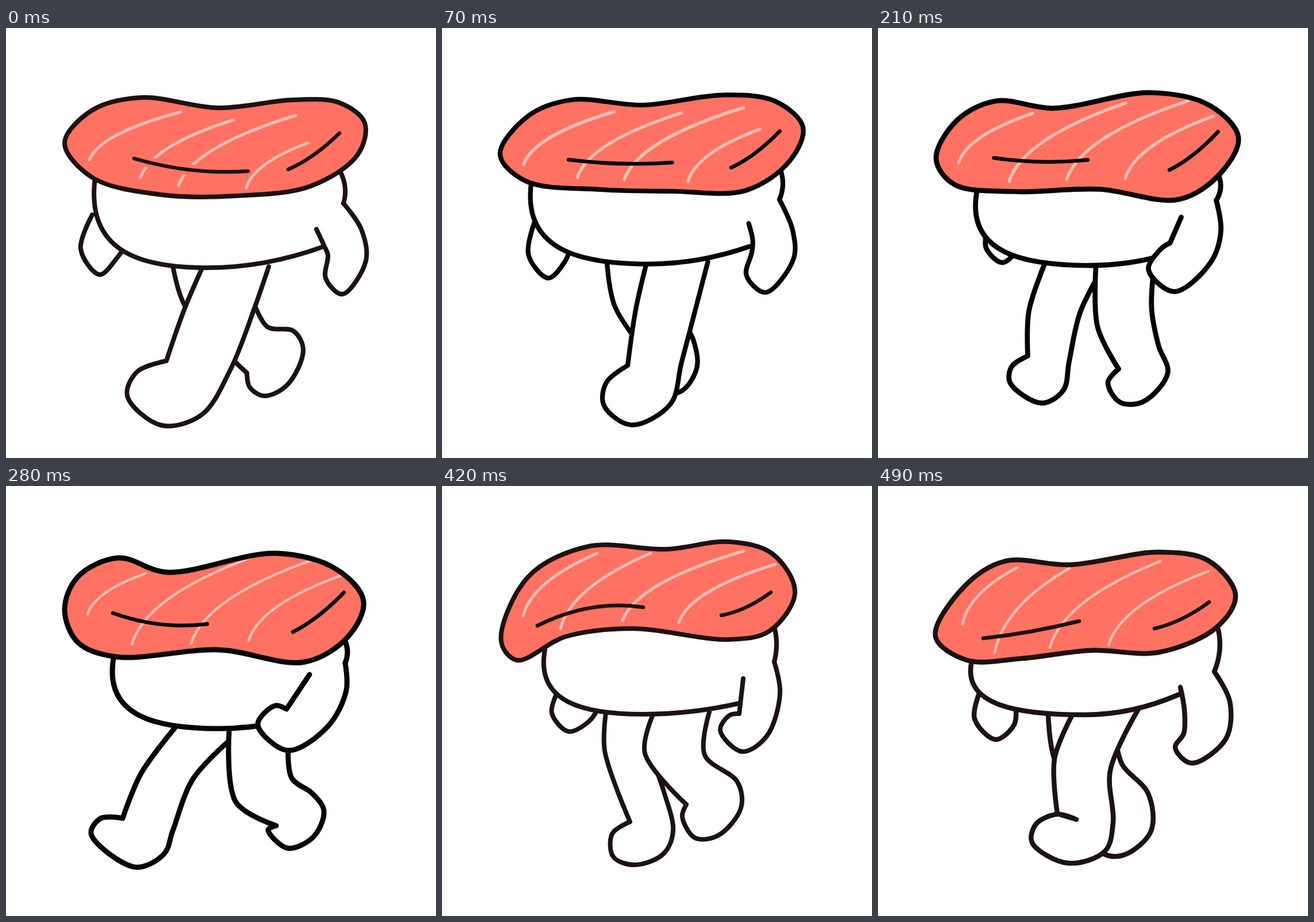
These frames come from a looping animation (748 px wide and 748 px high, 0.56 s). An HTML page with a canvas:

```html
<!DOCTYPE html>
<html lang="en">
<head>
<meta charset="utf-8">
<title>Walking sushi</title>
<style>
html, body { margin: 0; width: 100%; height: 100%; overflow: hidden; background: #fff; }
canvas { display: block; }
</style>
</head>
<body>
<canvas id="stage" width="748" height="748"></canvas>
<script>
const ctx = document.getElementById('stage').getContext('2d');
const STEP = 70;
const SALMON = '#ff7262', STRIPE = '#ffbdb4', BROWN = '#1c1211', BLACK = '#040404';
const PARTS = ['slab', 'body', 'farArm', 'farLeg', 'nearLeg', 'nearArm', 'creases', 'stripes'];

const mix = (a, b, t) => ({ x: a.x + (b.x - a.x) * t, y: a.y + (b.y - a.y) * t, sharp: a.sharp || b.sharp });

// Key points are "x,y"; "!" marks a sharp corner.
const parse = (text = '') => text.split(' ').filter(Boolean).map(p => {
  const [x, y] = p.split(',').map(parseFloat);
  return { x, y, sharp: p.endsWith('!') };
});

function makePose(pose) {
  for (const part of PARTS) pose[part] = parse(pose[part]);
  return pose;
}

// Drawing halfway between two poses with matching key points.
function between(a, b) {
  const pose = { ink: BLACK };
  for (const key of ['line', 'stripe', 'sag']) pose[key] = (a[key] + b[key]) / 2;
  for (const part of PARTS) pose[part] = a[part].map((p, i) => mix(p, b[part][i], 0.5));
  return pose;
}

// slab: clockwise outline; body: left rim, lowest point, right end, right rim;
// legs: hip, knee, ankle, around the foot, ankle, knee, hip;
// creases and stripes: pairs of end points.
const stride = makePose({
  ink: BROWN, line: 8, stripe: 5, sag: 9, gap: true,
  slab: '102,200 150,260 270,290 400,292 530,275 612,220 624,165 580,130 500,125 370,139 235,121 150,143',
  body: '155,260 350,417 553,380 583,253',
  farArm: '150,325 130,385 163,429 193,400 203,386',
  farLeg: '290,412 312,485 419,600! 424,625 450,640 490,620 517,560 500,527 455,520 428,470',
  nearLeg: '340,420 310,490 279,579! 228,598 211,640 270,691 340,673 390,595 433,485 457,415',
  nearArm: '587,305 618,350 626,405 585,463 556,435 560,395 553,378 540,350',
  creases: '223,227 421,249 491,246 580,183',
  stripes: '145,229 304,146 234,260 395,160 300,274 504,152 418,278 525,200'
});

const stand = makePose({
  ink: BLACK, line: 8.5, stripe: 6, sag: 0,
  slab: '100,240 140,272 280,272 400,276 528,290 598,242 632,180 580,125 480,108 330,129 215,129 150,163',
  body: '156,275 370,404 517,380 596,245',
  farArm: '172,350 171,405 207,441 235,412 239,392',
  farLeg: '284,402 290,485 318,563 300,600 312,630 345,642 370,620 375,560 378,480 390,400',
  nearLeg: '370,404 364,490 367,595 344,635 352,672 388,690 455,635 443,570 455,470 468,398',
  nearArm: '587,292 601,350 597,398 540,457 503,425 518,385 528,360 527,330',
  creases: '217,231 380,219 515,240 595,176',
  stripes: '139,245 295,145 237,259 437,136 334,253 545,125 438,255 581,152'
});

const reach = makePose({
  ink: BLACK, line: 9, stripe: 4.5, sag: 10,
  slab: '102,215 125,272 190,297 370,285 520,306 595,262 622,200 575,145 470,117 280,150 195,125 125,158',
  body: '187,300 370,422 480,410 590,270',
  farArm: '210,340 205,360 225,375 245,365 250,345',
  farLeg: '296,418 235,500 203,578! 165,578 148,605 225,663 275,640 290,600 325,510 386,445',
  nearLeg: '388,428 400,550 470,591! 456,598 490,630 535,610 553,565 533,535 497,508 491,445',
  nearArm: '590,308 592,355 560,418 490,460 438,415 468,382 488,388! 528,328',
  creases: '186,221 350,240 499,254 588,185',
  stripes: '142,223 243,152 219,275 425,125 322,274 535,128 422,269 585,155'
});

const plant = makePose({
  ink: BLACK, line: 8, stripe: 4.5, sag: -6,
  slab: '99,235 130,281 220,292 360,278 500,296 590,250 615,195 575,135 490,104 315,129 205,113 115,185',
  body: '182,290 370,404 480,390 586,250',
  farLeg: '284,400 275,490 283,586! 245,615 245,652 285,663 350,637 367,605 364,520 378,470',
  nearLeg: '370,402 384,498 457,544! 450,565 470,593 515,578 553,530 548,492 510,483 496,440',
  nearArm: '586,295 584,350 550,420 485,448 441,400 470,367 497,378! 524,332',
  creases: '166,241 333,239 490,249 578,181',
  stripes: '135,220 261,127 210,262 408,119 314,264 541,117 423,257 588,146'
});

const lift = makePose({
  ink: BROWN, line: 8, stripe: 5, sag: -15,
  slab: '103,270 130,303 215,262 330,248 500,267 570,252 614,185 575,118 500,97 390,110 255,105 150,158',
  body: '179,285 350,397 517,378 578,245',
  farArm: '200,360 191,395 220,427 255,410 270,390',
  farLeg: '285,395 283,460 327,584! 296,605 298,645 335,659 385,640 402,600 387,535 375,500',
  nearLeg: '366,400 353,465 425,554! 418,575 440,612 480,608 520,560 514,515 457,468 465,393',
  nearArm: '578,306 588,360 565,435 522,462 484,425 500,399 517,396! 524,335',
  creases: '166,243 350,211 486,225 572,185',
  stripes: '141,226 270,117 206,248 363,117 314,234 525,113 412,237 580,136'
});

const pass = makePose({
  ink: BROWN, line: 8.5, stripe: 4.5, sag: 3,
  slab: '100,262 155,303 250,300 370,286 490,289 590,245 622,190 575,130 490,115 335,137 220,131 150,175',
  body: '163,305 360,398 525,362 592,250',
  farArm: '178,355 168,405 205,441 237,415 240,388',
  farLeg: '296,398 304,465 340,560 365,610 395,641 430,641 475,600 470,535 425,485 414,445',
  nearLeg: '337,400 307,475 312,570! 345,580! 312,571 275,588 268,620 330,656 395,635 409,585 404,495 453,388',
  nearArm: '585,323 612,375 605,440 545,482 517,455 532,430 533,390 526,350',
  creases: '183,265 350,235 481,248 576,202',
  stripes: '147,240 242,142 203,290 333,143 299,281 491,131 401,277 575,148'
});

const walk = [stride, between(stride, stand), stand, between(stand, reach), reach, plant, lift, pass];

// Bezier handle leaving q towards r on a centripetal spline.
function handle(p, q, r) {
  const a = Math.sqrt(Math.hypot(q.x - p.x, q.y - p.y));
  const b = Math.sqrt(Math.hypot(r.x - q.x, r.y - q.y));
  if (!a) return q;
  const at = k => (a * a * r[k] - b * b * p[k] + (2 * a * a + 3 * a * b + b * b) * q[k]) / (3 * a * (a + b));
  return { x: at('x'), y: at('y') };
}

function spline(points, closed) {
  const pts = points.flatMap(p => p.sharp ? [p, p] : [p]);
  const n = pts.length;
  const at = i => closed ? pts[(i + n) % n] : pts[Math.max(0, Math.min(n - 1, i))];
  const path = new Path2D();
  if (!n) return path;
  path.moveTo(pts[0].x, pts[0].y);
  for (let i = 0; i < (closed ? n : n - 1); i++) {
    const q = at(i), r = at(i + 1);
    const c = handle(at(i - 1), q, r), d = handle(at(i + 2), r, q);
    path.bezierCurveTo(c.x, c.y, d.x, d.y, r.x, r.y);
  }
  if (closed) path.closePath();
  return path;
}

function arc(from, to, cx, cy) {
  const path = new Path2D();
  path.moveTo(from.x, from.y);
  path.quadraticCurveTo(cx, cy, to.x, to.y);
  return path;
}

// Rice: a rounded bowl, plus the short bulge above the shoulder.
function bowl([left, low, end, rim], shoulder) {
  const path = new Path2D();
  path.moveTo(left.x, left.y);
  path.bezierCurveTo(left.x - 17, left.y + (low.y - left.y) * 0.83,
    left.x + (low.x - left.x) * 0.41, low.y, low.x, low.y);
  path.quadraticCurveTo((low.x + end.x) / 2, low.y, end.x, end.y);
  path.addPath(arc(rim, shoulder, Math.max(rim.x, shoulder.x) + 8, (rim.y + shoulder.y) / 2));
  return path;
}

// Stripes rise steeply, then lean over towards the tip.
function hook(foot, tip) {
  return arc(foot, tip, foot.x + (tip.x - foot.x) * 0.12, foot.y + (tip.y - foot.y) * 0.55);
}

function sagging(a, b, sag) {
  return arc(a, b, (a.x + b.x) / 2, (a.y + b.y) / 2 + 2 * sag);
}

function stroke(path, color, width) {
  ctx.strokeStyle = color;
  ctx.lineWidth = width;
  ctx.stroke(path);
}

function draw(pose) {
  ctx.fillStyle = '#fff';
  ctx.fillRect(0, 0, 748, 748);
  ctx.lineCap = ctx.lineJoin = 'round';

  const shapes = [spline(pose.farArm), spline(pose.farLeg), spline(pose.nearLeg),
    bowl(pose.body, pose.nearArm[0]), spline(pose.nearArm)];
  for (const shape of shapes) {
    ctx.fill(shape);
    stroke(shape, pose.ink, pose.line);
  }

  const slab = spline(pose.slab, true);
  const [a, b, c, d] = pose.creases;
  const crease = sagging(a, b, pose.sag);
  ctx.fillStyle = SALMON;
  ctx.fill(slab);
  ctx.save();
  ctx.clip(slab);
  for (let i = 0; i < pose.stripes.length; i += 2) {
    stroke(hook(pose.stripes[i], pose.stripes[i + 1]), STRIPE, pose.stripe);
  }
  if (pose.gap) stroke(crease, SALMON, 18);
  ctx.restore();
  stroke(crease, pose.ink, 6.5);
  stroke(sagging(c, d, 6), pose.ink, 6.5);
  stroke(slab, pose.ink, pose.line);
}

const start = performance.now();
function tick() {
  const time = performance.now() - start;
  draw(walk[Math.floor(time / STEP) % walk.length]);
  requestAnimationFrame(tick);
}
tick();
</script>
</body>
</html>
```
